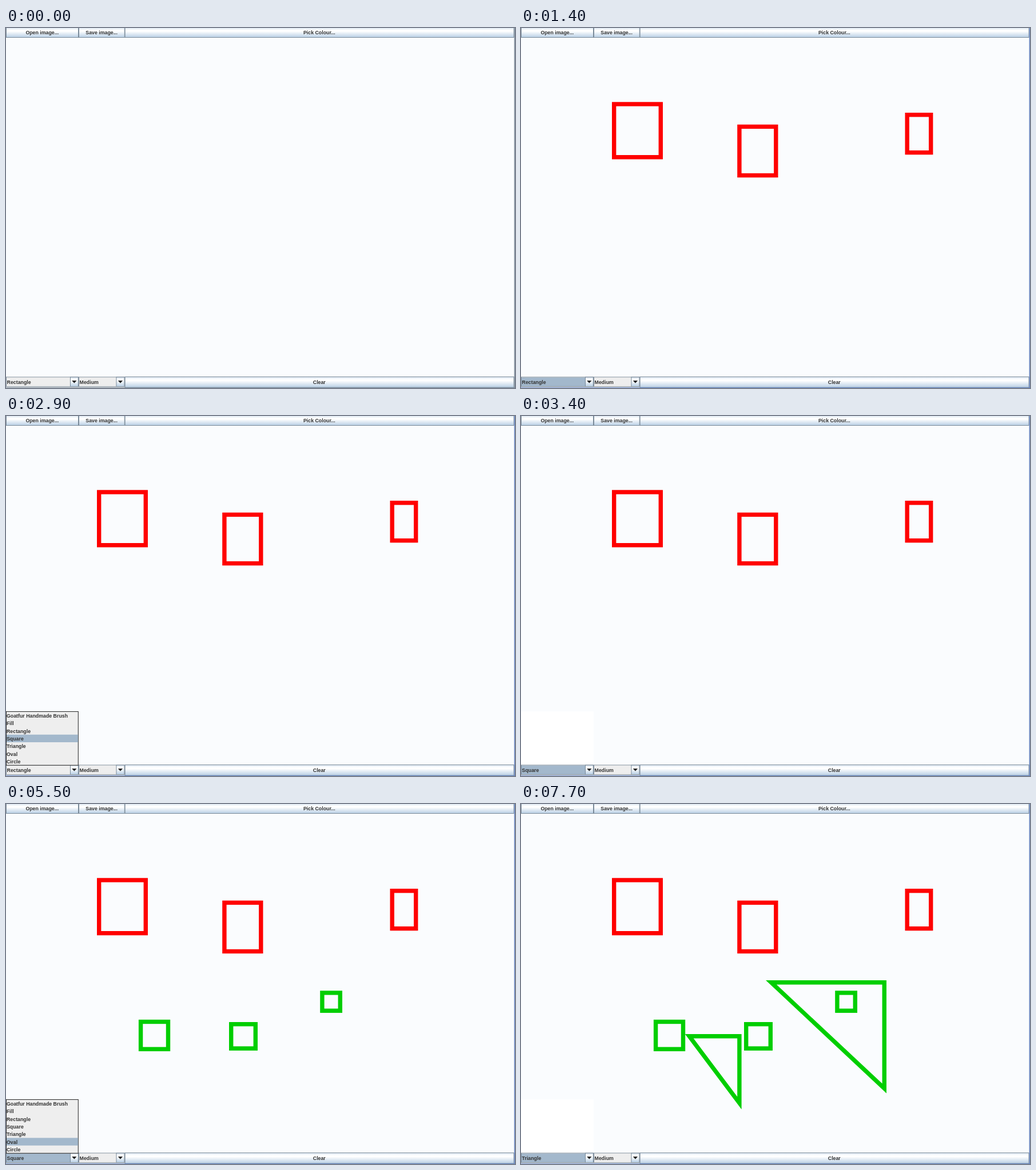
An HTML page that plays this animation: 890 px wide and 629 px high, repeating every 8 s.

```html
<!DOCTYPE html>
<html lang="en">
<head>
<meta charset="utf-8">
<title>Paint demo</title>
<style>
  html, body { margin: 0; width: 100%; height: 100%; overflow: hidden; background: #fafcfe; }
  svg { display: block; }
  text { font: bold 8.8px "Liberation Sans", Arial, sans-serif; fill: #333; white-space: pre; }
</style>
</head>
<body>
<svg id="stage" width="890" height="629" viewBox="0 0 890 629">
  <defs>
    <linearGradient id="metal" x1="0" y1="0" x2="0" y2="1">
      <stop offset="0" stop-color="#dde8f3"/>
      <stop offset=".27" stop-color="#fff"/>
      <stop offset=".36" stop-color="#fff"/>
      <stop offset="1" stop-color="#b8cfe5"/>
    </linearGradient>
  </defs>
</svg>
<script>
const LOOP = 8000;
const STROKE = 7.4;
const RED = '#f00', GREEN = '#00ce00';
const GREY = '#eee', EDGE = '#7a8a99', SELECTED = '#a3b8cc';
const TOOLS = ['Goatfur Handmade Brush', 'Fill', 'Rectangle', 'Square', 'Triangle', 'Oval', 'Circle'];
const ROW = 13.33, LIST_TOP = 516.7;

const stage = document.getElementById('stage');

function add(tag, attrs, parent = stage) {
  const node = document.createElementNS('http://www.w3.org/2000/svg', tag);
  for (const key in attrs) node.setAttribute(key, attrs[key]);
  parent.appendChild(node);
  return node;
}

function box(x, y, width, height, fill, parent) {
  return add('rect', { x, y, width, height, fill }, parent);
}

function label(text, x, y, anchor = 'start', parent) {
  const node = add('text', { x, y, 'text-anchor': anchor }, parent);
  node.textContent = text;
  return node;
}

function button(text, left, right, top, bottom, baseline) {
  add('rect', {
    x: left + .5, y: top + .5, width: right - left - .5, height: bottom - top - 1,
    fill: 'url(#metal)', stroke: EDGE
  });
  label(text, (left + right) / 2, baseline, 'middle');
}

function combo(text, left, arrowX, right) {
  add('rect', { x: left + .5, y: 610, width: right - left - .5, height: 16.5, fill: GREY, stroke: EDGE });
  const field = box(left + 1, 610.7, arrowX - left - 1, 15.4, GREY);
  add('rect', { x: arrowX + .5, y: 610, width: right - arrowX - .5, height: 16.5, fill: 'url(#metal)', stroke: EDGE });
  const mid = (arrowX + right) / 2;
  add('path', { d: `M${mid - 4} 616h8.4l-4.2 4.4z`, fill: '#222' });
  return { field, text: label(text, left + 1.6, 621.7) };
}

// Shapes are given by their outer bounds and the time they appear.
const drawn = [];

function frame(time, color, x, y, right, bottom) {
  const node = add('rect', {
    x: x + STROKE / 2, y: y + STROKE / 2,
    width: right - x - STROKE, height: bottom - y - STROKE,
    fill: 'none', stroke: color, 'stroke-width': STROKE
  });
  drawn.push({ time, node });
}

function triangle(time, color, x, y, right, bottom) {
  const w = right - x, h = bottom - y;
  const inradius = (w + h - Math.hypot(w, h)) / 2;
  const scale = 1 - STROKE / 2 / inradius;
  const cx = right - inradius, cy = y + inradius;
  const inset = (px, py) => `${cx + (px - cx) * scale} ${cy + (py - cy) * scale}`;
  const node = add('path', {
    d: `M${inset(x, y)}L${inset(right, y)}L${inset(right, bottom)}Z`,
    fill: 'none', stroke: color, 'stroke-width': STROKE, 'stroke-miterlimit': 10
  });
  drawn.push({ time, node });
}

box(0, 0, 890, 629, '#fafcfe');
const cleared = box(0, 516, 127, 94, '#fff');

frame(400, RED, 159, 129.3, 248, 229.4);
frame(800, RED, 378.2, 168.7, 449.5, 261.2);
frame(1400, RED, 671.5, 148, 720.4, 221.3);
frame(3700, GREEN, 231.9, 376.8, 287.2, 432);
frame(4200, GREEN, 390, 381, 440, 430.8);
frame(4500, GREEN, 549.2, 326.2, 588, 364.9);
triangle(6900, GREEN, 286.8, 402, 385.6, 533.6);
triangle(7700, GREEN, 428, 308, 639, 505.6);

button('Open image...', 0, 126.5, -1, 17, 11.1);
button('Save image...', 127, 207.3, -1, 17, 11.1);
button('Pick Colour...', 207.6, 888, -1, 17, 11.1);
box(0, 609, 890, 20, GREY);
const tool = combo('Rectangle', 0, 112, 126.3);
combo('Medium', 127, 192.5, 207);
button('Clear', 207.6, 888, 609, 628.6, 622.2);
const edges = [box(888.6, 0, 1.4, 629), box(0, 628, 890, 1)];

const popup = add('g', {});
add('rect', { x: .5, y: 516.4, width: 125.8, height: 93.8, fill: GREY, stroke: '#222' }, popup);
const marker = box(1, LIST_TOP, 125, ROW, SELECTED, popup);
TOOLS.forEach((name, i) => label(name, 1, LIST_TOP + ROW * i + 10.2, 'start', popup));

function show(node, visible) {
  node.setAttribute('visibility', visible ? 'visible' : 'hidden');
}

function hovered(t) {
  if (t < 2900) return 'Rectangle';
  if (t < 5500) return 'Square';
  return t < 5600 ? 'Oval' : 'Triangle';
}

function render(t) {
  const within = (from, to) => t >= from && t < to;
  const active = within(300, 2000) || t >= 2700;
  const firstList = within(2800, 3400);

  for (const { time, node } of drawn) show(node, t >= time);
  show(cleared, t >= 3400);
  show(popup, firstList || within(5300, 6000));
  marker.setAttribute('y', LIST_TOP + ROW * TOOLS.indexOf(hovered(t)));

  tool.text.textContent = t < 3400 ? 'Rectangle' : t < 6000 ? 'Square' : 'Triangle';
  tool.field.setAttribute('fill', active && !firstList ? SELECTED : GREY);
  for (const edge of edges) edge.setAttribute('fill', active ? '#6382bf' : EDGE);
}

const start = performance.now();
function tick() {
  render((performance.now() - start) % LOOP);
  requestAnimationFrame(tick);
}
tick();
</script>
</body>
</html>
```
